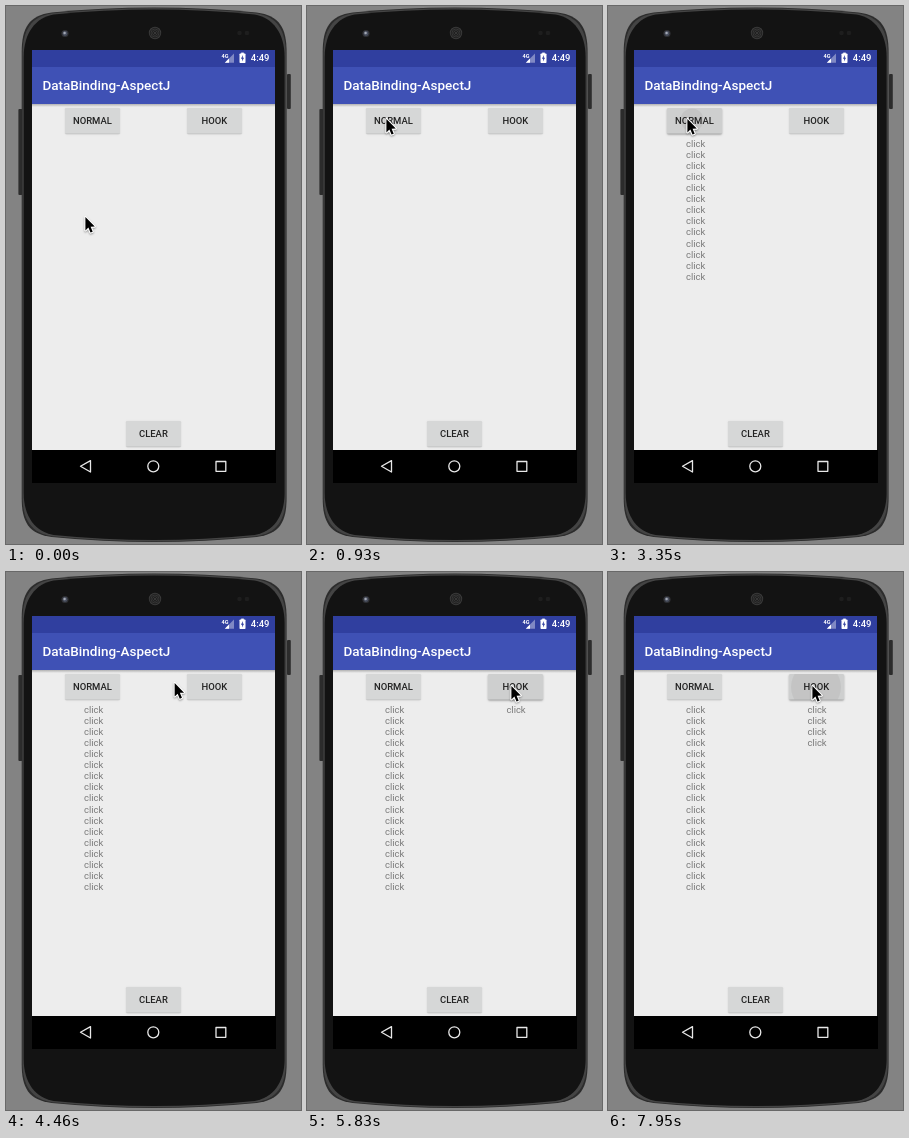
These frames come from a looping animation (295 px wide and 538 px high, 8 s). An HTML page with a canvas:

```html
<!DOCTYPE html>
<html lang="en">
<head>
<meta charset="utf-8">
<title>DataBinding-AspectJ</title>
<style>
html, body { margin: 0; width: 100%; height: 100%; overflow: hidden; background: #838383; }
canvas { display: block; width: 295px; height: 538px; }
</style>
</head>
<body>
<canvas id="stage"></canvas>
<script>
const W = 295, H = 538, LOOP = 8000;
const canvas = document.getElementById('stage');
const dpr = window.devicePixelRatio || 1;
canvas.width = W * dpr;
canvas.height = H * dpr;
const ctx = canvas.getContext('2d');
const FONT = 'Roboto, "Open Sans", sans-serif';

// Cursor path: time, x, y, easing power towards this point
const path = [
  [0, 79, 211, 1], [29, 79, 211, 1], [30, 79, 209, 1], [200, 79, 209, 1],
  [380, 73, 133, 1.6], [630, 73, 133, 1], [740, 70, 124, 1],
  [930, 79, 113, 1.6], [4280, 79, 113, 1], [4460, 168, 111, 1],
  [4810, 198, 114, 3], [5160, 198, 114, 1], [5240, 204, 114, 1], [LOOP, 204, 114, 1]
];

const normalClicks = [1350, 1520, 1690, 1860, 2030, 2210, 2370, 2530, 2690,
  2870, 3050, 3200, 3350, 3500, 3650, 3810, 3960];
const hookClicks = [5530, 6300, 6780, 7460];

const clamp = v => Math.max(0, Math.min(1, v));
const ramp = (t, a, b) => clamp((t - a) / (b - a));
const pulse = (t, a, b, c, d) => ramp(t, a, b) * (1 - ramp(t, c, d));

function rect(x, y, w, h, color) {
  ctx.fillStyle = color;
  ctx.fillRect(x, y, w, h);
}

function round(x, y, w, h, r, color) {
  ctx.beginPath();
  ctx.roundRect(x, y, w, h, r);
  ctx.fillStyle = color;
  ctx.fill();
}

function disc(x, y, r, color) {
  ctx.beginPath();
  ctx.arc(x, y, r, 0, Math.PI * 2);
  ctx.fillStyle = color;
  ctx.fill();
}

function poly(points, color) {
  ctx.beginPath();
  points.forEach(([x, y]) => ctx.lineTo(x, y));
  ctx.closePath();
  if (color) {
    ctx.fillStyle = color;
    ctx.fill();
  }
}

function text(str, x, y, size, weight, color, align = 'left') {
  ctx.font = `${weight} ${size}px ${FONT}`;
  ctx.textAlign = align;
  ctx.fillStyle = color;
  ctx.fillText(str, x, y);
}

// Phone outline; a larger soft value rounds the corners more
function shell(inset, soft, color) {
  const l = 15.7 + inset, r = 280.6 - inset, t = 1.5 + inset, b = 536 - inset;
  const top = 46 + soft, low = 492 - soft, pull = 22 + soft;
  ctx.beginPath();
  ctx.moveTo(l, top);
  ctx.bezierCurveTo(l, pull, l + 7 + soft, t + 8, l + 30, t + 5);
  ctx.quadraticCurveTo(148, t - 5, r - 30, t + 5);
  ctx.bezierCurveTo(r - 7 - soft, t + 8, r, pull, r, top);
  ctx.lineTo(r, low);
  ctx.bezierCurveTo(r, 538 - pull, r - 7 - soft, b - 8, r - 30, b - 5);
  ctx.quadraticCurveTo(148, b + 5, l + 30, b - 5);
  ctx.bezierCurveTo(l + 7 + soft, b - 8, l, 538 - pull, l, low);
  ctx.closePath();
  ctx.fillStyle = color;
  ctx.fill();
}

function drawPhone() {
  rect(0, 0, W, H, '#838383');
  round(12.4, 103, 4, 86, 1, '#2c2c2c');
  round(281, 68, 3.8, 35, 1, '#2c2c2c');
  shell(0, 0, '#2c2c2c');
  shell(0.8, 2, '#444');
  shell(2, 5, '#131313');

  disc(59, 27.5, 3.6, '#303135');
  disc(59, 27.5, 2.4, '#4a5060');
  disc(58.6, 27, 1.2, '#a4a9b4');
  disc(149, 27, 6.2, '#3b3b3b');
  ctx.strokeStyle = '#191919';
  ctx.lineWidth = 0.8;
  for (const r of [1.6, 3.2, 4.8]) {
    ctx.beginPath();
    ctx.arc(149, 27, r, 0, Math.PI * 2);
    ctx.stroke();
  }
  disc(233.5, 27, 2.3, '#1e1e1e');
  disc(241, 27, 2.3, '#1e1e1e');
}

function drawStatus() {
  rect(26, 44, 243, 17, '#303f9f');
  text('4G', 215.5, 52, 5.5, 700, '#fff');
  poly([[228, 47.5], [228, 56.7], [218.8, 56.7]], '#8089c4');
  poly([[223, 52.5], [223, 56.7], [218.8, 56.7]], '#fff');
  rect(235.2, 46.6, 2.6, 2, '#fff');
  round(233.5, 47.6, 6, 9.3, 0.7, '#fff');
  poly([[237, 49.1], [234.9, 52.8], [236.2, 52.8], [236, 55.5], [238.1, 51.8], [236.8, 51.8]], '#303f9f');
  text('4:49', 244.8, 55, 9.45, 500, '#fff');
}

function drawNav() {
  rect(26, 444, 244, 33, '#000');
  ctx.strokeStyle = '#e8e8e8';
  ctx.lineWidth = 1.3;
  ctx.lineJoin = 'round';
  poly([[74.5, 460.3], [84.5, 454.6], [84.5, 466]]);
  ctx.stroke();
  ctx.beginPath();
  ctx.arc(147.3, 460.3, 5.5, 0, Math.PI * 2);
  ctx.stroke();
  ctx.strokeRect(210, 455.5, 9.8, 9.8);
}

function drawButton(label, x, y, press = 0, ripple = null) {
  ctx.save();
  ctx.shadowColor = `rgba(0,0,0,${0.22 + 0.1 * press})`;
  ctx.shadowBlur = (1.2 + 0.8 * press) * dpr;
  ctx.shadowOffsetY = (0.6 + 0.5 * press) * dpr;
  round(x, y, 55, 25.6, 1.4, '#d6d7d7');
  ctx.restore();
  if (press > 0) {
    ctx.save();
    ctx.beginPath();
    ctx.roundRect(x, y, 55, 25.6, 1.4);
    ctx.clip();
    rect(x, y, 55, 26, `rgba(0,0,0,${0.035 * press})`);
    disc(ripple.x, ripple.y, ripple.r, `rgba(0,0,0,${0.05 * ripple.level})`);
    ctx.restore();
  }
  text(label, x + 27.4, y + 16, 9.45, 500, '#222', 'center');
}

function drawClicks(times, t, x) {
  times.forEach((at, i) => {
    if (t >= at) text('click', x, 141 + 11.06 * i, 9.45, 400, '#7a7a7a');
  });
}

function cursorAt(t) {
  let i = 1;
  while (i < path.length - 1 && t > path[i][0]) i++;
  const [t0, x0, y0] = path[i - 1];
  const [t1, x1, y1, power] = path[i];
  const k = 1 - Math.pow(1 - ramp(t, t0, t1), power);
  return [x0 + (x1 - x0) * k, y0 + (y1 - y0) * k];
}

function drawCursor(t) {
  const [x, y] = cursorAt(t);
  const arrow = [[0, 0], [0, 13.4], [3, 10.6], [5.1, 15.6], [7.3, 14.7], [5.2, 9.8], [9.4, 9.6]];
  ctx.save();
  ctx.translate(x + 0.4, y);
  ctx.shadowColor = 'rgba(0,0,0,0.35)';
  ctx.shadowBlur = 2 * dpr;
  ctx.shadowOffsetY = dpr;
  ctx.lineJoin = 'round';
  ctx.strokeStyle = '#fff';
  ctx.lineWidth = 2.2;
  poly(arrow);
  ctx.stroke();
  ctx.shadowColor = 'transparent';
  poly(arrow, '#000');
  ctx.restore();
}

function draw(t) {
  ctx.setTransform(dpr, 0, 0, dpr, 0, 0);
  drawPhone();
  rect(26, 98, 243, 346, '#ededed');
  const shade = ctx.createLinearGradient(0, 98, 0, 101);
  shade.addColorStop(0, 'rgba(0,0,0,0.25)');
  shade.addColorStop(1, 'rgba(0,0,0,0)');
  rect(26, 98, 243, 3, shade);
  drawStatus();
  rect(26, 61, 243, 37, '#3f51b5');
  text('DataBinding-AspectJ', 36.4, 84, 13.5, 500, '#fff');

  const normal = pulse(t, 1150, 1300, 3980, 4120);
  const grow = ramp(t, 1150, 1350);
  drawButton('NORMAL', 59, 102, normal, { x: 84, y: 114, r: 5 + 6.5 * grow, level: normal });
  const hook = ramp(t, 5470, 5530);
  const spread = ramp(t, 5830, 6070);
  drawButton('HOOK', 181, 102, hook, { x: 208, y: 115, r: 8 + 17 * spread, level: spread });
  drawButton('CLEAR', 120, 415);

  drawClicks(normalClicks, t, 78);
  drawClicks(hookClicks, t, 199.4);
  drawNav();
  drawCursor(t);
}

const start = performance.now();
function tick() {
  draw((performance.now() - start) % LOOP);
  requestAnimationFrame(tick);
}
tick();
</script>
</body>
</html>
```
